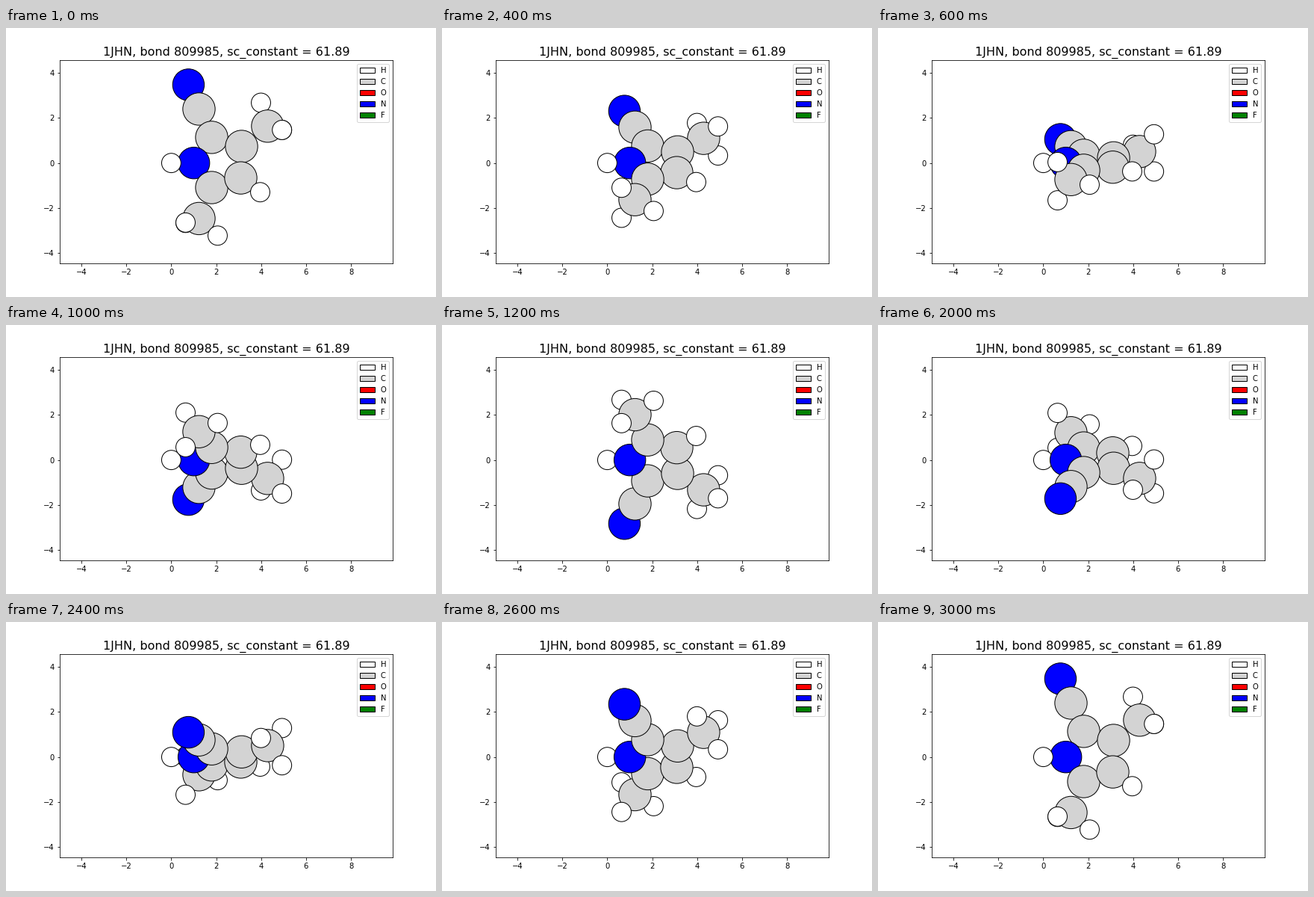
Recreate the animation shown at these times as a matplotlib script. Size 576 by 360 pixels, loop 3200 ms.

```python
import numpy as np
import matplotlib.pyplot as plt
from matplotlib.animation import FuncAnimation
from matplotlib.patches import Circle, Patch

FRAMES = 16
INTERVAL = 200

COLORS = {"H": "white", "C": "lightgray", "O": "red", "N": "blue", "F": "green"}
RADII = {"H": 0.43, "C": 0.72, "N": 0.705}

# element, x, y, z (z points towards the viewer)
ATOMS = [
    ("H", 0.0, 0.0, 0.0),
    ("N", 1.005, 1e-6, -1e-6),
    ("C", 1.80, 1.14, -0.010),
    ("C", 1.80, -1.093, 0.015),
    ("C", 3.13, 0.736, 0.0),
    ("C", 3.095, -0.664, 0.020),
    ("C", 1.233, 2.40, -0.019),
    ("N", 0.765, 3.48, -0.025),
    ("C", 1.233, -2.47, 0.028),
    ("C", 4.29, 1.64, 0.0),
    ("H", 3.96, -1.30, 0.028),
    ("H", 2.064, -3.23, 0.035),
    ("H", 0.635, -2.65, 0.905),
    ("H", 0.635, -2.665, -0.88),
    ("H", 3.993, 2.68, -0.018),
    ("H", 4.93, 1.47, 0.865),
    ("H", 4.93, 1.47, -0.875),
]

plt.rcParams.update({"font.family": "DejaVu Sans", "font.size": 10})
fig, ax = plt.subplots(figsize=(8, 5), dpi=72)
fig.subplots_adjust(left=0.125, right=0.9, bottom=0.125, top=0.88)
ax.set_xlim(-4.967, 9.874)
ax.set_ylim(-4.466, 4.569)
ax.set_xticks(range(-4, 9, 2))
ax.set_yticks(range(-4, 5, 2))
ax.set_title("1JHN, bond 809985, sc_constant = 61.89", fontsize=16)
ax.legend(
    handles=[Patch(facecolor=c, edgecolor="black", label=e) for e, c in COLORS.items()],
    loc="upper right",
)

xs, ys, zs = np.array([atom[1:] for atom in ATOMS]).T
balls = [
    ax.add_patch(Circle((x, y), RADII[e], facecolor=COLORS[e], edgecolor="black", lw=1))
    for e, x, y, _ in ATOMS
]


def update(i):
    """Turn the molecule about the x axis; the last pose repeats the first."""
    angle = 2 * np.pi * i / (FRAMES - 1)
    c, s = np.cos(angle), np.sin(angle)
    height = ys * c + zs * s
    depth = zs * c - ys * s
    order = np.argsort(np.argsort(depth, kind="stable"))
    for ball, x, y, rank in zip(balls, xs, height, order):
        ball.center = (x, y)
        ball.set_zorder(1 + 0.02 * rank)
    return balls


anim = FuncAnimation(
    fig, update, frames=FRAMES, interval=INTERVAL, repeat=True, repeat_delay=0, blit=False
)
plt.show()
```
